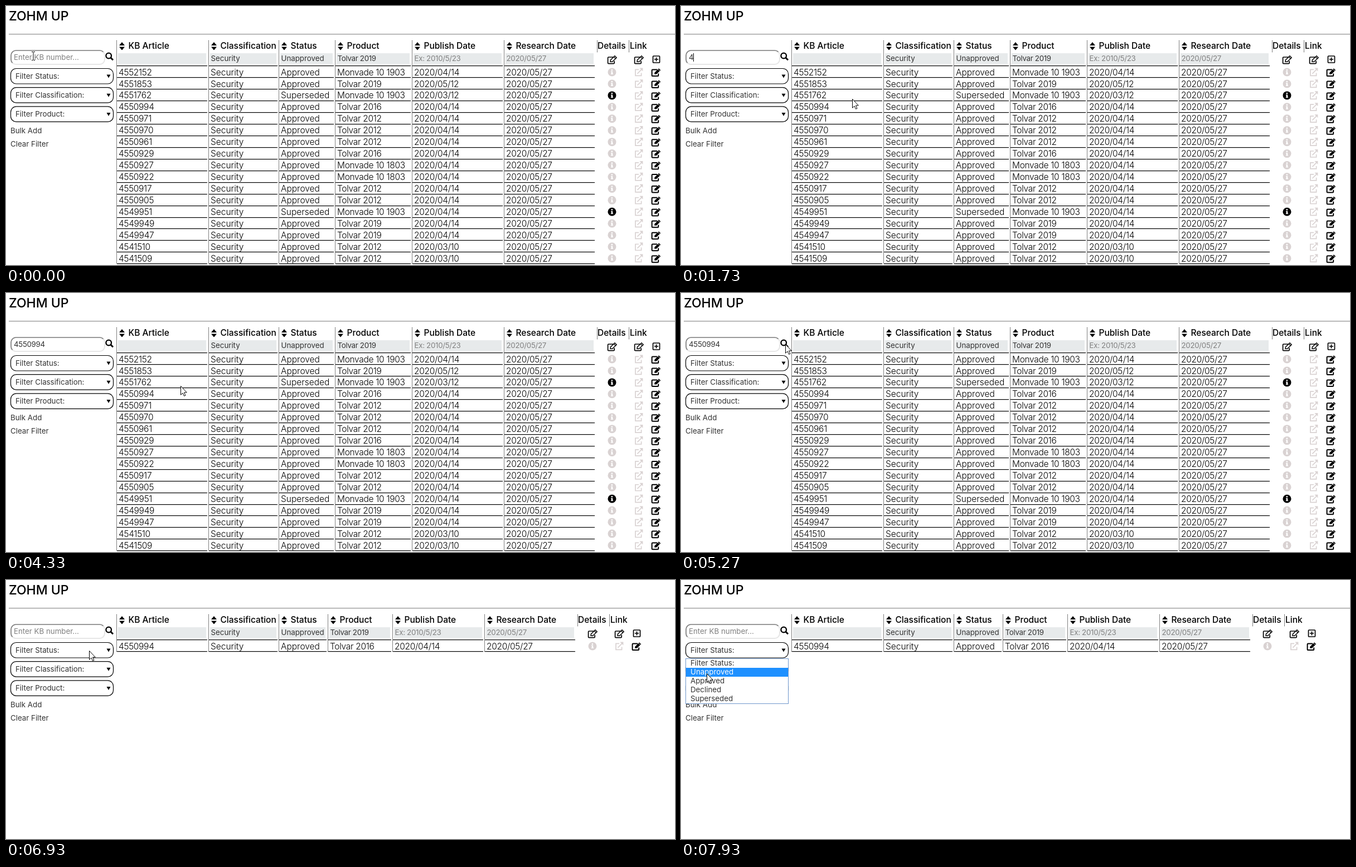
An HTML page that plays this animation: 1200x466 px, repeating every 8 s.

```html
<!DOCTYPE html>
<html lang="en">
<head>
<meta charset="utf-8">
<title>Update list</title>
<style>
  html, body { margin: 0; width: 100%; height: 100%; overflow: hidden; background: #fff; }
  svg { display: block; width: 1200px; height: 466px; font: 13.3px Inter, "Open Sans", sans-serif; }
  text { white-space: pre; fill: #333; }
  .title { font-size: 23px; font-weight: 500; fill: #000; }
  .head { font-size: 15.5px; font-weight: 500; fill: #000; }
  .cell { font-size: 15.5px; font-weight: 300; fill: #000; }
  .hint { fill: #808080; }
  .num { letter-spacing: -.3px; }
  .line { fill: none; stroke: currentColor; stroke-width: 1.7; }
  .pale { color: #d9d2d2; }
</style>
</head>
<body>
<svg id="stage" viewBox="0 0 1200 466"></svg>
<script>
const LOOP = 8000, TICK = 1000 / 15, ROW = 20.94;
const label = (x, y, s, cls = '') =>
  `<text x="${x}" y="${y}" class="${cls}${/\d/.test(s) ? ' num' : ''}">${s}</text>`;
const box = (x, y, w, h, fill, extra = '') =>
  `<rect x="${x}" y="${y}" width="${w}" height="${h}" fill="${fill}" ${extra}/>`;
const dotted = (x, y1, y2) =>
  `<path d="M${x + .5} ${y1}V${y2}" stroke="#000" stroke-dasharray="1 1"/>`;

// Icons are centred on 0,0
const PAGE = 'M2-5H-6.2a1.2 1.2 0 0 0-1.2 1.2V5.4a1.2 1.2 0 0 0 1.2 1.2H3a1.2 1.2 0 0 0 1.2-1.2V2';
const PEN = 'M-3 3.2l.4-3L5-7.2 8.2-4 .7 3.2z';
const icons = {
  sort: '<path d="M-5-1L0-7L5-1zM-5 1.6H5L0 7.4z"/>',
  edit: `<path class="line" d="${PAGE}"/><path class="line" style="stroke-width:1.4" d="${PEN}M3.3-5.4L6.4-2.3"/>`,
  editSolid: `<path class="line" style="stroke-width:2" d="${PAGE}"/><path fill="currentColor" d="${PEN}"/>
    <path d="M3.4-6L7-2.4" stroke="#fff" stroke-width=".8"/>`,
  link: `<path class="line" d="M0-4.6H-6V6.4H4.6V1.4"/><path class="line" d="M-2.6 2.8L5-4.8"/>
    <path fill="currentColor" d="M1.4-7.6H7.4V-1.6z"/>`,
  info: `<circle r="7.5" fill="currentColor"/><path fill="#fff" d="M-1.3-5H1.1V-2.6H-1.3zM-2-1.4H1.2V2.6H2V4H-2V2.6H-1.2V0H-2z"/>`,
  plus: '<rect class="line" x="-6" y="-6" width="12" height="12" rx="1"/><path class="line" d="M-3.6 0H3.6M0-3.6V3.6"/>',
};
const icon = (name, x, y, cls = '') =>
  `<g transform="translate(${x} ${y})" class="${cls}">${icons[name]}</g>`;

const products = { a: 'Monvade 10 1903', b: 'Monvade 10 1803', c: 'Tolvar 2019', d: 'Tolvar 2016', e: 'Tolvar 2012' };
const rows = `4552152 a 04/14,4551853 c 05/12,4551762 a 03/12 old,4550994 d 04/14,4550971 e 04/14,4550970 e 04/14,
4550961 e 04/14,4550929 d 04/14,4550927 b 04/14,4550922 b 04/14,4550917 e 04/14,4550905 e 04/14,4549951 a 04/14 old,
4549949 c 04/14,4549947 c 04/14,4541510 e 03/10,4541509 e 03/10`.split(',').map(r => r.trim().split(' '));
const headings = ['KB Article', 'Classification', 'Status', 'Product', 'Publish Date', 'Research Date'];
const entries = ['', 'Security', 'Unapproved', 'Tolvar 2019', 'Ex: 2010/5/23', '2020/05/27'];

function table(id, list, columns) {
  const end = columns[6], bottom = 108 + ROW * list.length;
  let out = '';
  headings.forEach((name, i) => {
    const x = columns[i], next = columns[i + 1];
    out += dotted(x, 62, bottom) + icon('sort', x + 10, 72) + label(x + 21.5, 77, name, 'head')
      + box(x + 3, 85, next - x - 7, 19, '#e7eaeb') + label(x + 4.5, 99, entries[i], i > 3 ? 'hint' : '');
    for (let r = 0; r <= list.length; r++)
      out += box(x + 1, Math.round(107.3 + ROW * r), next - x - 3, 1.2, '#000');
  });
  out += dotted(end + 2, 62, 83) + label(end + 3, 77, 'Details', 'head')
    + dotted(end + 59, 62, 83) + label(end + 61, 77, 'Link', 'head')
    + icon('edit', end + 29, 97) + icon('edit', end + 77, 97) + icon('plus', end + 108.5, 96);
  list.forEach(([kb, product, date, old], r) => {
    const y = 119 + ROW * r;
    [kb, 'Security', old ? 'Superseded' : 'Approved', products[product], '2020/' + date, '2020/05/27']
      .forEach((s, i) => out += label(columns[i] + 4, y + 5.6, s, 'cell'));
    out += icon('info', end + 29, y, old ? '' : 'pale') + icon('link', end + 77, y, 'pale')
      + icon('editSolid', end + 108, y + .5);
  });
  return `<g id="${id}">${out}</g>`;
}

const select = (y, s) => box(8.5, y + .5, 184, 27.5, '#fff', 'rx="10" stroke="#000" stroke-width="1.2"')
  + label(17, y + 19, s) + `<path d="M180.5 ${y + 11.5}h7l-3.5 6z"/>`;

const options = ['Filter Status:', 'Unapproved', 'Approved', 'Declined', 'Superseded'];
const $ = id => document.getElementById(id);
$('stage').innerHTML = label(5, 26, 'ZOHM UP', 'title')
  + box(5, 50, 1195, 1, '#969696') + box(5, 51, 1195, .6, '#ccc')
  + box(9, 80, 168, 25, '#fff', 'rx="9" stroke="#e6e6e6" stroke-width="2"')
  + '<path class="line" style="stroke:#808080" d="M11.5 102.5A9 9 0 0 1 9 96V89a9 9 0 0 1 9-9H168a9 9 0 0 1 6.5 2.6"/>'
  + '<text id="query" x="14" y="97"></text>' + box(0, 85, 1, 15, '#000', 'id="caret"')
  + '<circle cx="184.2" cy="89.5" r="4.8" fill="none" stroke="#000" stroke-width="2.3"/>'
  + '<path d="M187.8 93L192 97.3" stroke="#000" stroke-width="3"/>'
  + ['Status', 'Classification', 'Product'].map((s, i) => select(112 + 34.2 * i, `Filter ${s}:`)).join('')
  + label(8, 229, 'Bulk Add') + label(8, 253, 'Clear Filter')
  + table('full', rows, [198, 363, 489, 590, 728, 893, 1058])
  + table('found', [rows[3]], [198, 363, 489, 577, 693, 858, 1023])
  + `<g id="menu">${box(8.5, 141.5, 184, 81, '#fff', 'stroke="#6f97cc"')}${box(9, 142, 183, 16, '#1e90ff', 'id="mark"')}
    ${options.map((s, i) => label(17, 154 + 16 * i, s, 'option')).join('')}</g>`
  + '<path id="arrow" d="M.5.5V16.3L4 13l2.5 5.4 2.4-1.1L6.5 12h4.8z" fill="#fff" stroke="#000"/>'
  + '<path id="beam" d="M-3-7.5h2.2l.8.8.8-.8H3M0-6.5v13M-3 7.5h2.2l.8-.8.8.8H3" fill="none" stroke="#000"/>';

// Pointer positions: time, x, y
const pointer = [
  [0, 49, 90], [133, 55, 90], [267, 55, 90], [1000, 307, 167], [4267, 307, 167], [4333, 313, 167],
  [4533, 610, 201], [4667, 744, 165], [4867, 540, 67], [5133, 187, 98], [5267, 187, 92], [6067, 187, 92],
  [6333, 293, 104], [6733, 140, 122], [6933, 149, 127], [7133, 166, 131], [7600, 166, 131], [7933, 46, 168],
];
const keyTimes = [1730, 2000, 2200, 2470, 2930, 3200, 3400];
const caretTimes = [[330, 830], [1330, 3930], [4430, 4930]];

function pointerAt(t) {
  const i = pointer.findIndex(p => p[0] > t);
  if (i < 0) return pointer.at(-1).slice(1);
  const [t0, x0, y0] = pointer[i - 1], [t1, x1, y1] = pointer[i], k = (t - t0) / (t1 - t0);
  return [x0 + (x1 - x0) * k, y0 + (y1 - y0) * k];
}
const show = (id, on) => $(id).setAttribute('visibility', on ? 'visible' : 'hidden');

function draw(t) {
  const [x, y] = pointerAt(Math.floor((t + 4) / TICK) * TICK);
  const filtered = t >= 5870;
  const typed = filtered ? '' : '4550994'.slice(0, keyTimes.filter(k => k <= t).length);
  const query = $('query');
  query.textContent = typed || 'Enter KB number...';
  query.setAttribute('class', typed ? 'num' : 'hint');
  $('caret').setAttribute('x', 14 + (typed && Math.round(query.getComputedTextLength())));
  show('caret', caretTimes.some(([a, b]) => t >= a && t < b));
  show('full', !filtered);
  show('found', filtered);
  show('menu', t >= 7330);

  const hovered = y >= 158 ? 1 : 0;
  $('mark').setAttribute('y', 142 + 16 * hovered);
  document.querySelectorAll('.option').forEach((o, i) => o.style.fill = i === hovered ? '#fff' : '');

  const overInput = x > 8 && x < 178 && y > 79 && y < 106;
  show('beam', overInput);
  show('arrow', !overInput);
  for (const id of ['beam', 'arrow'])
    $(id).setAttribute('transform', `translate(${Math.round(x)} ${Math.round(y)})`);
}

const start = performance.now();
function frame() {
  draw((performance.now() - start) % LOOP);
  requestAnimationFrame(frame);
}
frame();
</script>
</body>
</html>
```
